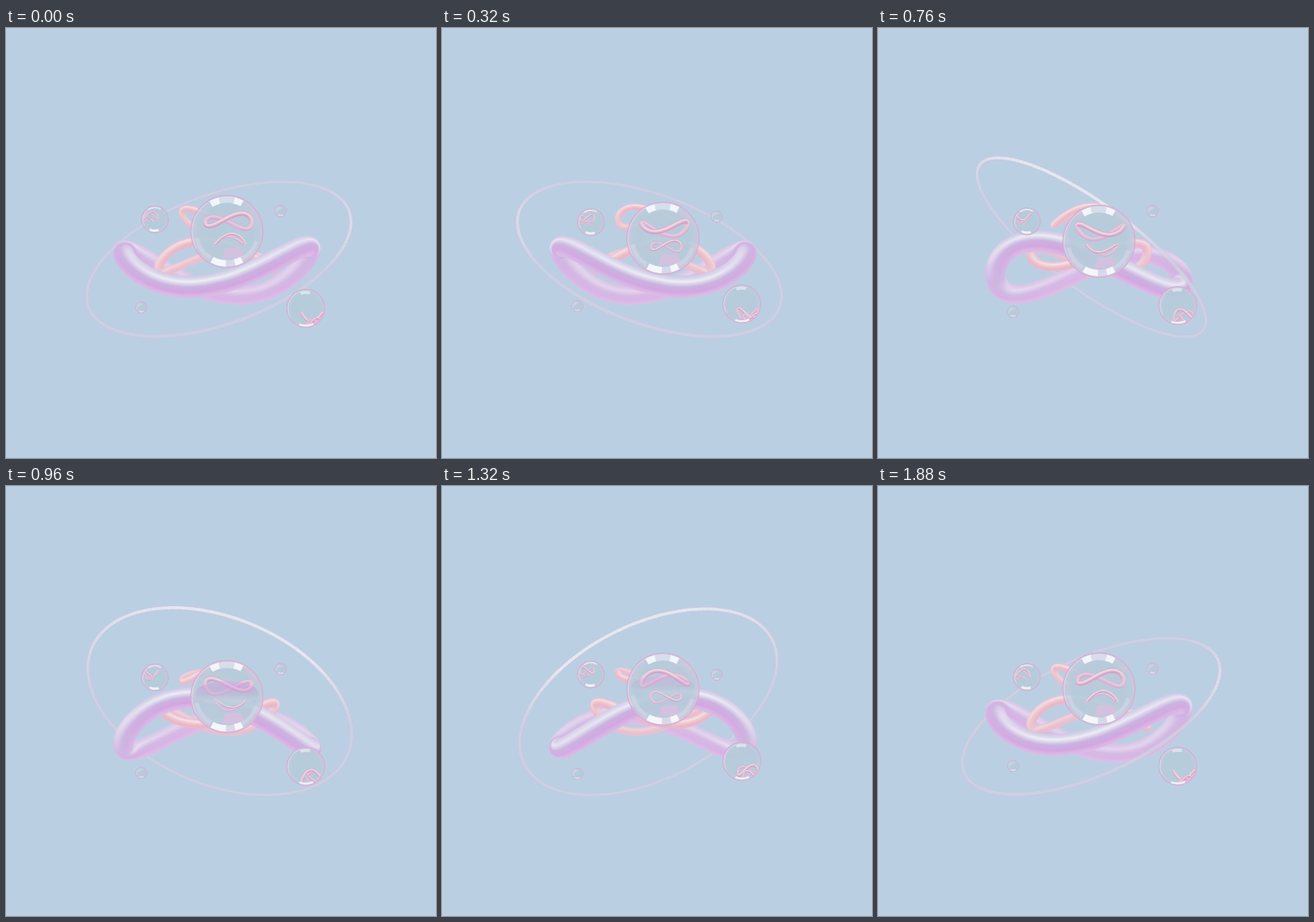
Recreate the animation shown at these times as an HTML page with a canvas. Size 540 by 540 pixels, loop 1920 ms.

```html
<!DOCTYPE html>
<html lang="en">
<head>
<meta charset="utf-8">
<title>Floating rings and bubbles</title>
<style>
  html, body { margin: 0; width: 100%; height: 100%; overflow: hidden; background: #bbcfe3; }
  canvas { display: block; width: 100vw; height: 100vh; }
</style>
</head>
<body>
<canvas id="stage" width="540" height="540"></canvas>
<script>
const ctx = document.getElementById('stage').getContext('2d');
const LOOP = 1920, STEP = 40, TAU = Math.PI * 2;
const EYE = { x: 264, y: 281, tilt: 0.087, depth: 1270 };

const rgb = hex => [1, 3, 5].map(i => parseInt(hex.slice(i, i + 2), 16));
const mix = (a, b, k) => a.map((v, i) => v + (b[i] - v) * k);
const css = (c, a = 1) => `rgba(${c.map(Math.round).join()},${a})`;
const clamp = v => Math.max(0, Math.min(1, v));
const rad = deg => deg * Math.PI / 180;
const wave = (t, mid, amp, peak, period = LOOP) => mid + amp * Math.cos(TAU * (t - peak) / period);

// Colours run from the lit upper side to the lower side of a tube.
const LILAC = {
  ramp: ['#c5cbe3', '#eceff5', '#c9b3df', '#d4a5e1', '#e3b9e8'].map(rgb),
  rim: rgb('#d3c3e4'), far: rgb('#dfc0e9')
};
const PEACH = {
  ramp: ['#e9c3d6', '#f5e4e4', '#efc7cd', '#eab4c4', '#ecbdd4'].map(rgb),
  rim: rgb('#e8b5cf'), far: rgb('#e6c6d4')
};
const ROSE = {
  ramp: ['#e89ccb', '#eee3e4', '#dfd2d7', '#df9ecb', '#da8bc8'].map(rgb),
  rim: rgb('#df9acb'), far: rgb('#d9bcdc')
};

function rampAt(ramp, w) {
  const p = clamp((w + 1) / 2) * (ramp.length - 1);
  const i = Math.min(ramp.length - 2, Math.floor(p));
  return mix(ramp[i], ramp[i + 1], p - i);
}

// World space: x right, y up, z towards the viewer.
function project(x, y, z) {
  const c = Math.cos(EYE.tilt), s = Math.sin(EYE.tilt);
  const depth = z * c - y * s;
  const scale = 1 / (1 - depth / EYE.depth);
  return { x: EYE.x + x * scale, y: EYE.y - (y * c + z * s) * scale, z: depth, scale };
}

// A ring whose height ripples twice round its circumference.
function knotPoint(o, u) {
  const x = o.R * Math.cos(u), z = o.R * Math.sin(u);
  const y = o.C * Math.cos(2 * u + o.phase);
  if (o.flat) return { x: o.x + x, y: o.y + y - z * 0.1, z, scale: 1 };
  return project(x + 1, EYE.y - o.y - y, z);
}

function knot(o) {
  const items = [];
  const count = Math.max(90, Math.round(o.R * 2.2));
  for (let i = 0; i < count; i++) {
    const u = TAU * i / count;
    const p = knotPoint(o, u), q = knotPoint(o, u + 0.01);
    const dx = q.x - p.x, dy = q.y - p.y, len = Math.hypot(dx, dy) || 1;
    const flip = dx < 0 ? -1 : 1;
    items.push({ z: p.z, draw: () => bead(p, -dy / len * flip, dx / len * flip, o) });
  }
  return items;
}

function bead(p, nx, ny, o) {
  const r = o.r * p.scale;
  const g = ctx.createLinearGradient(p.x - nx * r, p.y - ny * r, p.x + nx * r, p.y + ny * r);
  const far = 0.6 * clamp(0.5 - p.z / (2 * o.R));
  for (let i = 0; i <= 8; i++) {
    const s = i / 4 - 1;
    let c = rampAt(o.skin.ramp, s * ny);
    c = mix(c, o.skin.rim, clamp(Math.abs(s) * 2 - 1) * 0.6);
    g.addColorStop(i / 8, css(mix(c, o.skin.far, far)));
  }
  ctx.fillStyle = g;
  disc(p.x, p.y, r);
}

function disc(x, y, r) {
  ctx.beginPath();
  ctx.arc(x, y, r, 0, TAU);
  ctx.fill();
}

function arc(x, y, r, from, to, width, color) {
  ctx.beginPath();
  ctx.arc(x, y, r, rad(from), rad(to));
  ctx.lineWidth = width;
  ctx.strokeStyle = color;
  ctx.stroke();
}

// Thin glass hoop: a rigid tilted circle that precesses about the vertical.
function hoop(psi) {
  const R = 173, tilt = rad(37.9), ct = Math.cos(tilt), st = Math.sin(tilt);
  const hx = -Math.sin(psi), hz = -Math.cos(psi);
  const at = u => {
    const a = R * Math.cos(u), b = R * Math.sin(u);
    const w = { y: a * st, z: a * hz * ct + b * hx };
    return Object.assign(project(a * hx * ct - b * hz, w.y, w.z), { w });
  };
  const items = [], count = 150;
  for (let i = 0; i < count; i++) {
    const a = at(TAU * i / count), b = at(TAU * (i + 1.04) / count);
    const shine = clamp(a.w.z / R * 0.9 + 0.3) * clamp(a.w.y / 60 + 0.4);
    items.push({ z: a.z, draw: () => {
      const line = (width, color) => {
        ctx.beginPath();
        ctx.moveTo(a.x, a.y);
        ctx.lineTo(b.x, b.y);
        ctx.lineWidth = width * a.scale;
        ctx.strokeStyle = color;
        ctx.stroke();
      };
      line(6, 'rgba(214,192,219,.42)');
      line(3.6, 'rgba(198,210,226,.6)');
      line(3.4, `rgba(240,243,248,${0.1 + 0.6 * shine})`);
    } });
  }
  return items;
}

function paint(items) {
  items.sort((a, b) => a.z - b.z).forEach(item => item.draw());
}

function bubble(x, y, r, inside) {
  ctx.save();
  ctx.beginPath();
  ctx.arc(x, y, r, 0, TAU);
  ctx.clip();
  const g = ctx.createRadialGradient(x, y, 0, x, y, r);
  g.addColorStop(0, 'rgba(182,204,219,.93)');
  g.addColorStop(0.72, 'rgba(181,203,218,.92)');
  g.addColorStop(0.9, 'rgba(190,203,221,.85)');
  g.addColorStop(1, 'rgba(215,193,220,.8)');
  ctx.fillStyle = g;
  disc(x, y, r);
  inside();
  ctx.restore();
  arc(x, y, r - 0.7, 0, 360, r > 12 ? 1.4 : 1, 'rgba(216,170,208,.75)');
  arc(x, y, r - 2.2, 150, 250, 0.8, 'rgba(240,238,246,.6)');
}

function mini(x, y, R, C, r, phase) {
  return knot({ flat: true, x, y, R, C, r, phase, skin: ROSE });
}

function bigBubble(t, psi) {
  const x = 277.5, y = wave(t, 260, 8.3, 650), r = 46;
  bubble(x, y, r, () => {
    const lens = Math.exp(-(((t - 1120) / 170) ** 2));
    ctx.fillStyle = 'rgba(222,190,225,.75)';
    ctx.beginPath();
    ctx.moveTo(x - 2, y + 21);
    ctx.lineTo(x + 17, y + 20);
    ctx.lineTo(x + 24, y + 33);
    ctx.lineTo(x - 6, y + 34);
    ctx.fill();
    arc(x, y, 39, 18, 62, 5, 'rgba(207,216,229,.7)');
    arc(x, y, 39, 122, 168, 5, 'rgba(207,216,229,.7)');
    ctx.globalAlpha = 1 - lens;
    paint(mini(x + 2, y - 13, 29, 7.5, 3, psi + rad(105)));
    paint(mini(x + 4, y + 10, 19, 5.5, 1.7, psi + rad(45)));
    ctx.globalAlpha = lens;
    if (lens > 0.01) {
      const ry = 24 * Math.sqrt(lens), cy = y - 4;
      const g = ctx.createLinearGradient(0, cy - ry, 0, cy + ry);
      g.addColorStop(0, '#dca8e2');
      g.addColorStop(0.25, '#cf92d9');
      g.addColorStop(0.5, '#bba9d0');
      g.addColorStop(0.8, '#ccd1df');
      g.addColorStop(1, '#c2cddf');
      ctx.fillStyle = g;
      ctx.beginPath();
      ctx.ellipse(x, cy, 40, ry, 0, 0, TAU);
      ctx.fill();
    }
    ctx.globalAlpha = 1;
    arc(x, y, 40, 240, 298, 8, 'rgba(222,228,238,.75)');
    arc(x, y, 40, 240, 256, 8, 'rgba(246,248,251,.9)');
    arc(x, y, 40, 283, 298, 8, 'rgba(246,248,251,.9)');
    arc(x, y, 40, 62, 118, 8, 'rgba(222,221,236,.8)');
    arc(x, y, 40, 62, 76, 8, '#f4f6fa');
    arc(x, y, 40, 92, 118, 8, '#f4f6fa');
  });
}

function sideBubbles(t, psi) {
  let x = 187, y = wave(t, 240.5, 4, 480);
  bubble(x, y, 17.5, () => {
    paint(mini(x - 5, y - 5, 9, 4, 1.1, psi + rad(60)));
    paint(mini(x - 7, y + 1, 5, 2, 0.7, psi));
    arc(x, y, 14, 70, 118, 3, 'rgba(243,245,250,.9)');
    arc(x, y, 15, 235, 300, 2, 'rgba(236,238,246,.8)');
  });
  x = 376.5;
  y = wave(t, 348, 4, 20, LOOP / 2);
  bubble(x, y, 24.5, () => {
    paint(mini(x + 8, y + 12, 13, 6, 1.8, psi + rad(200)));
    paint(mini(x + 11, y + 17, 9, 4, 1.2, psi + rad(80)));
    arc(x, y, 20, 250, 285, 4, 'rgba(226,231,240,.85)');
    arc(x, y, 22, 65, 112, 3, 'rgba(244,246,250,.9)');
  });
  const small = (sx, sy) => bubble(sx, sy, 8, () => {
    arc(sx, sy, 4, 190, 290, 1.5, 'rgba(225,222,235,.6)');
    arc(sx, sy, 5.5, 60, 125, 2, 'rgba(228,226,237,.8)');
    arc(sx + 1, sy, 2.5, -30, 110, 1, 'rgba(206,184,215,.7)');
  });
  small(345, wave(t, 233, 4, 380, LOOP / 2));
  small(170, wave(t, 355.5, 6.5, 1200));
}

function render(t) {
  const psi = TAU * (t - 160) / LOOP;
  ctx.fillStyle = '#bbcfe3';
  ctx.fillRect(0, 0, 540, 540);
  paint([
    ...hoop(psi),
    ...knot({ y: 304, R: 117, C: 27, r: 12.5, phase: psi + Math.PI, skin: LILAC }),
    ...knot({ y: 289, R: 73, C: 15, r: 5.7, phase: psi, skin: PEACH }),
    ...knot({ y: 238, R: 44, C: 9, r: 4.3, phase: psi - rad(100), skin: PEACH })
  ]);
  sideBubbles(t, psi);
  bigBubble(t, psi);
}

let shown = -1;
function tick() {
  const t = Math.floor(performance.now() / STEP) * STEP % LOOP;
  if (t !== shown) render(shown = t);
  requestAnimationFrame(tick);
}
tick();
</script>
</body>
</html>
```
